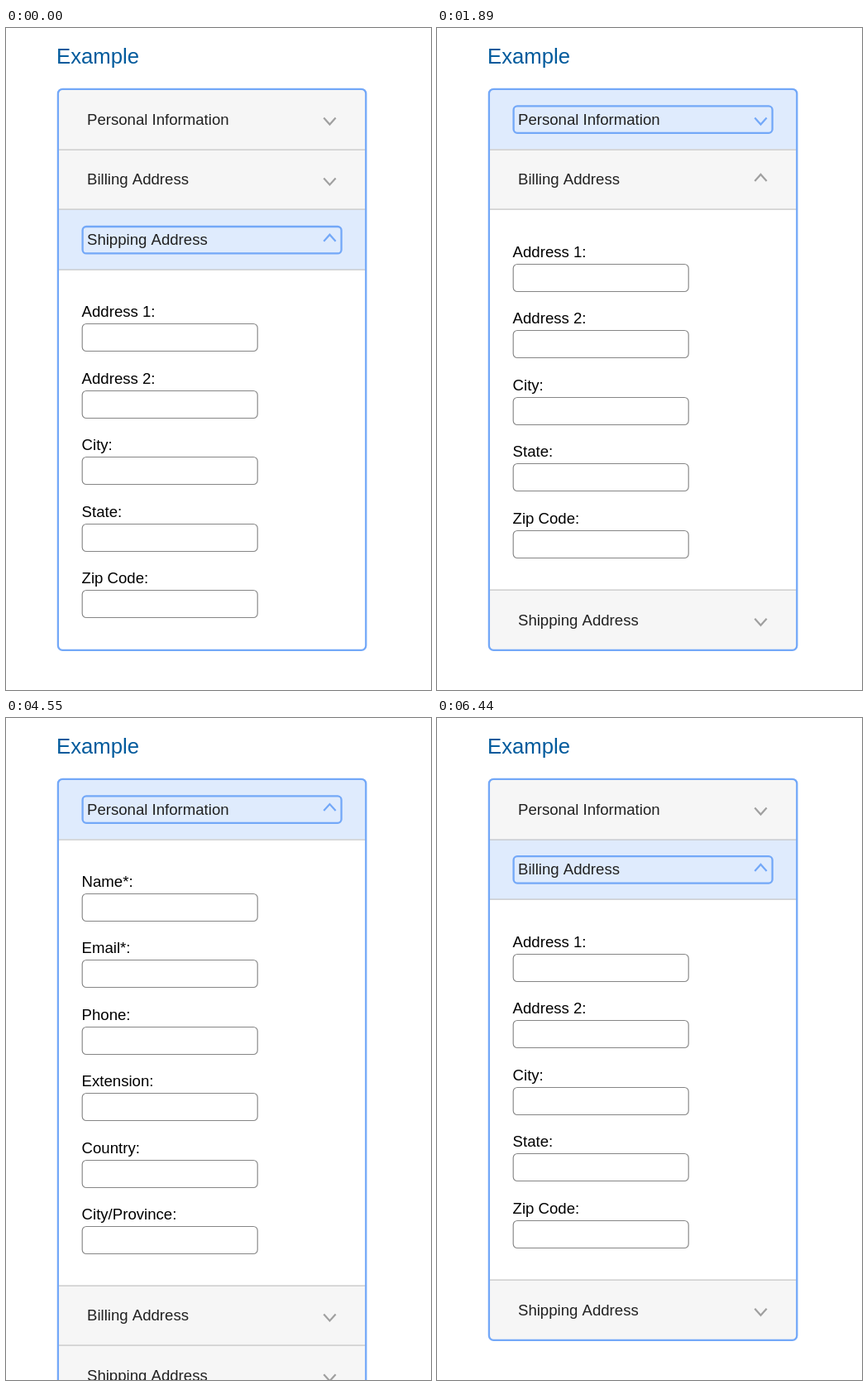
Write an HTML page with a canvas that moves like this. It is 514 px wide and 800 px high and loops after 6510 ms.

```html
<!DOCTYPE html>
<html lang="en">
<head>
<meta charset="utf-8">
<title>Accordion</title>
<style>
  html, body { margin: 0; width: 100%; height: 100%; overflow: hidden; background: #fff; }
  canvas { display: block; }
</style>
</head>
<body>
<canvas id="stage" width="514" height="800"></canvas>
<script>
const ctx = document.getElementById('stage').getContext('2d');
const LOOP = 6510;
const FONT = '"Liberation Sans", Arial, Helvetica, sans-serif';
const BLUE = '#73a8f8';
const LEFT = 62.9, RIGHT = 435.3, TOP = 73.8;
const HEADER = 72.8, STEP = 80.5;

const address = ['Address 1:', 'Address 2:', 'City:', 'State:', 'Zip Code:'];
const sections = [
  { title: 'Personal Information', height: 539,
    fields: ['Name*:', 'Email*:', 'Phone:', 'Extension:', 'Country:', 'City/Province:'] },
  { title: 'Billing Address', height: 459.6, fields: address },
  { title: 'Shipping Address', height: 459.6, fields: address }
];

// Each step: start time, open section, focused header
const steps = [
  [0, 2, 2],
  [840, 2, 1],
  [1400, 1, 1],
  [1820, 1, 0],
  [2590, 0, 0],
  [4690, 1, 1]
];

function text(str, x, y, size, color) {
  ctx.font = size + 'px ' + FONT;
  ctx.fillStyle = color;
  ctx.fillText(str, x, y);
}

function box(x, y, w, h, r, color, width) {
  ctx.beginPath();
  ctx.roundRect(x, y, w, h, r);
  ctx.strokeStyle = color;
  ctx.lineWidth = width;
  ctx.stroke();
}

function divider(y) {
  ctx.fillStyle = '#c4c4c4';
  ctx.fillRect(LEFT, Math.round(y) - 0.5, RIGHT - LEFT, 1.2);
}

function chevron(y, up, color) {
  const d = up ? -4 : 4;
  ctx.beginPath();
  ctx.moveTo(384.3, y - d);
  ctx.lineTo(391.5, y + d);
  ctx.lineTo(398.7, y - d);
  ctx.strokeStyle = color;
  ctx.lineWidth = 2.2;
  ctx.stroke();
}

function header(title, y, open, focused) {
  ctx.fillStyle = focused ? '#dfebfd' : '#f6f6f6';
  ctx.fillRect(LEFT, y, RIGHT - LEFT, HEADER);
  if (focused) box(92.6, y + 20.6, 313, 32.4, 4.5, BLUE, 2.3);
  text(title, 98, y + 42.8, 18.6, '#212121');
  chevron(y + (open ? 34.3 : 38.8), open, focused ? BLUE : '#a0a0a0');
}

function panel(fields, y) {
  fields.forEach((label, i) => {
    const top = y + i * STEP;
    text(label, 91.6, top + 57.2, 18.6, '#000');
    box(92.2, Math.round(top + 65.2) + 0.5, 212, 33, 5, '#868686', 1.15);
  });
}

function draw(open, focus) {
  ctx.fillStyle = '#fff';
  ctx.fillRect(0, 0, 514, 800);
  text('Example', 61, 43.4, 25.7, '#005a9c');

  const height = 3 * HEADER + sections[open].height;
  ctx.save();
  ctx.beginPath();
  ctx.roundRect(LEFT, TOP, RIGHT - LEFT, height, 5);
  ctx.clip();
  let y = TOP;
  sections.forEach((s, i) => {
    header(s.title, y, i === open, i === focus);
    if (i > 0) divider(y);
    y += HEADER;
    if (i === open) {
      divider(y);
      panel(s.fields, y);
      y += s.height;
    }
  });
  ctx.restore();
  box(LEFT, TOP, RIGHT - LEFT, height, 5.5, BLUE, 2.3);
}

const start = performance.now();
let shown = null;

function tick() {
  const t = (performance.now() - start) % LOOP;
  const step = steps.filter(s => s[0] <= t).pop();
  if (step !== shown) {
    shown = step;
    draw(step[1], step[2]);
  }
  requestAnimationFrame(tick);
}
tick();
</script>
</body>
</html>
```
